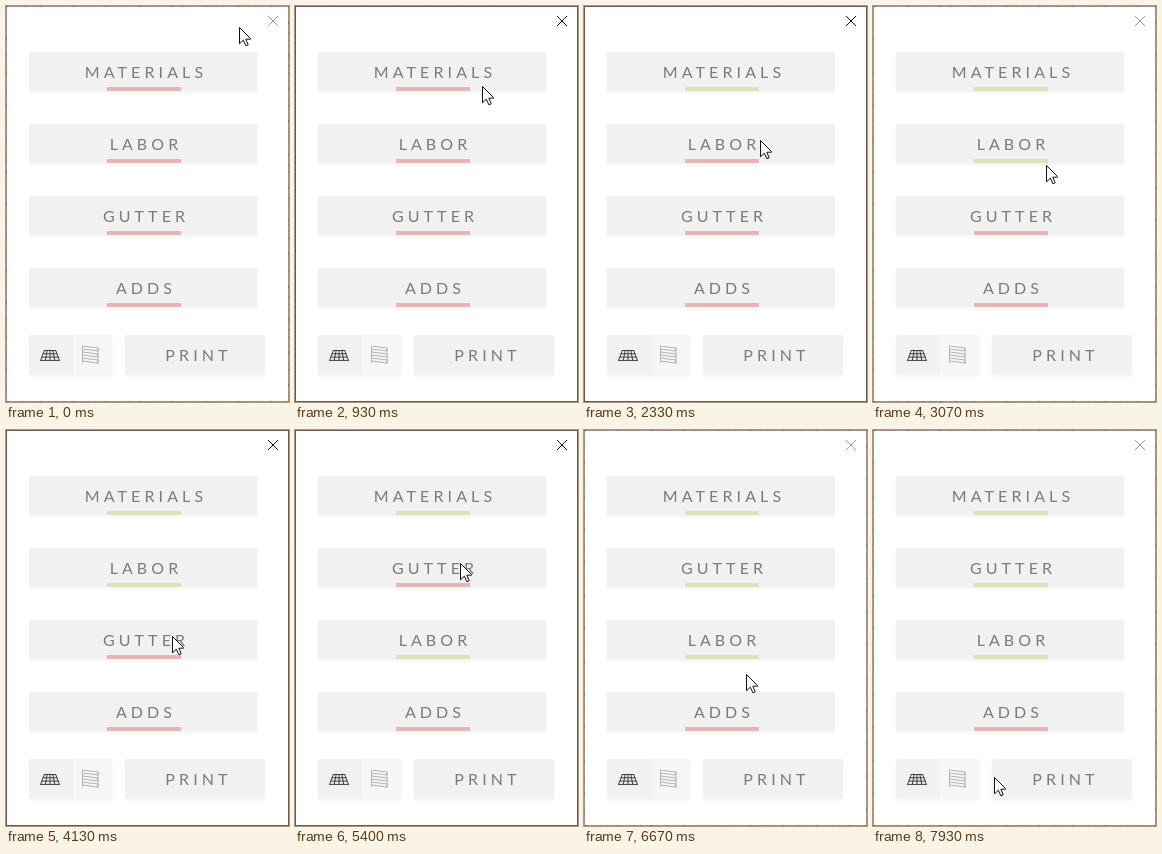
An HTML page for the animation above (8 s loop, 283 px wide and 396 px high).

```html
<!DOCTYPE html>
<html lang="en">
<head>
<meta charset="utf-8">
<style>
  html, body { margin: 0; width: 100%; height: 100%; overflow: hidden; background: #fff; }
  svg { display: block; width: 283px; height: 396px; }
  text { font: 16px Lato, "Open Sans", sans-serif; letter-spacing: 4.1px; text-anchor: middle; fill: #7b7b7b; }
  .button { fill: #f1f1f1; filter: drop-shadow(0 2px 1.5px #0000000b); }
  .line { fill: none; }
</style>
</head>
<body>
<svg viewBox="0 0 283 396">
  <rect width="283" height="396" fill="#fff"/>
  <rect id="frame" class="line" x=".5" y=".5" width="282" height="395"/>
  <rect id="specks" class="line" x=".5" y=".5" width="282" height="395" stroke="#6b6460" stroke-dasharray="2 9 1 6 1 14"/>
  <path id="close" class="line" d="M262 10l10 10m0-10l-10 10"/>
  <g id="buttons"></g>
  <g id="items"></g>

  <rect class="button" x="23" y="329" width="83" height="40" rx="2"/>
  <path d="M67 329h37q2 0 2 2v36q0 2-2 2H67z" fill="#f6f6f6"/>
  <path id="panel" class="line" stroke="#3c3c3c"/>
  <path id="fence" class="line" stroke="#b4b4b4"/>
  <rect class="button" x="119" y="329" width="140" height="40" rx="2"/>
  <text x="192.5" y="355">PRINT</text>

  <path id="cursor" d="M.5 .5V16.8L4.3 13.2 6.9 18.8 9.2 17.8 6.8 12.2H11.5V11.5z" fill="#fff" stroke="#111"/>
</svg>
<script>
const FPS = 15, FRAMES = 120;
const SWAP_TICK = 74, HIDE_TICKS = 4;
const byId = id => document.getElementById(id);
const rowTop = row => 46 + 72 * row;

// A click activates the window at `press`; the line turns green at `done`.
const items = [
  { label: "MATERIALS", press: 14, done: 18 },
  { label: "LABOR", press: 33, done: 37 },
  { label: "GUTTER", press: 62, done: 87 },
  { label: "ADDS", press: Infinity, done: Infinity },
];

// Pointer moves: start tick, end tick, destination
const home = [233, 21];
const moves = [
  [0, 9, 187, 80], [24, 31, 176, 134], [43, 46, 173, 159], [46, 48, 168, 190],
  [53, 57, 166, 206], [65, 74, 166, 153], [78, 81, 165, 133],
  [93, 100, 162, 244], [103, 110, 129, 346], [117, 119, 121, 347],
];

byId("buttons").innerHTML = items.map((_, row) =>
  `<rect class="button" x="23" y="${rowTop(row)}" width="228" height="39" rx="2"/>`).join("");
byId("items").innerHTML = items.map(({ label }) =>
  `<g><text x="140" y="25.7">${label}</text><rect x="101" y="35" width="74" height="4"/></g>`).join("");
const groups = [...byId("items").children];

// Solar panel in perspective, and a slanted fence with double rails
let panel = "", fence = "M76.5 340v17M92 342v16";
for (let i = 0; i < 5; i++) panel += `M${38.5 + 2.75 * i} 344L${34.5 + 4.75 * i} 354.5`;
for (let i = 0; i < 4; i++) panel += `M${38 - 1.3 * i} ${344.5 + 3.3 * i}H${50 + 1.3 * i}`;
for (let i = 0; i < 3; i++) fence += `M76.5 ${340 + 6 * i}l15.5 2v3l-15.5-2`;
byId("panel").setAttribute("d", panel);
byId("fence").setAttribute("d", fence);

function pointerAt(tick) {
  let [x, y] = home;
  for (const [from, to, endX, endY] of moves) {
    const k = Math.min(1, Math.max(0, (tick - from) / (to - from)));
    const eased = k * (2 - k);
    x += (endX - x) * eased;
    y += (endY - y) * eased;
  }
  return [Math.round(x), Math.round(y)];
}

function draw(ms) {
  const tick = Math.floor(ms * FPS / 1000 + 0.1) % FRAMES;
  const active = items.some(({ press, done }) => tick >= press && tick < done - 1);
  const hidden = items.some(({ done }) => tick >= done && tick < done + HIDE_TICKS);
  byId("close").setAttribute("stroke", active ? "#111" : "#999");
  byId("frame").setAttribute("stroke", active ? "#6b574d" : "#a78f83");
  byId("specks").setAttribute("opacity", active ? 0.3 : 0.8);

  items.forEach(({ done }, i) => {
    const swapped = tick >= SWAP_TICK && (i === 1 || i === 2);
    groups[i].setAttribute("transform", `translate(0 ${rowTop(swapped ? 3 - i : i)})`);
    groups[i].lastChild.setAttribute("fill", tick >= done ? "#d7e4bd" : "#e9b4b4");
  });

  byId("cursor").setAttribute("transform", `translate(${pointerAt(tick)})`);
  byId("cursor").setAttribute("visibility", hidden ? "hidden" : "visible");
}

const start = performance.now();
function loop() {
  draw(performance.now() - start);
  requestAnimationFrame(loop);
}
loop();
</script>
</body>
</html>
```
